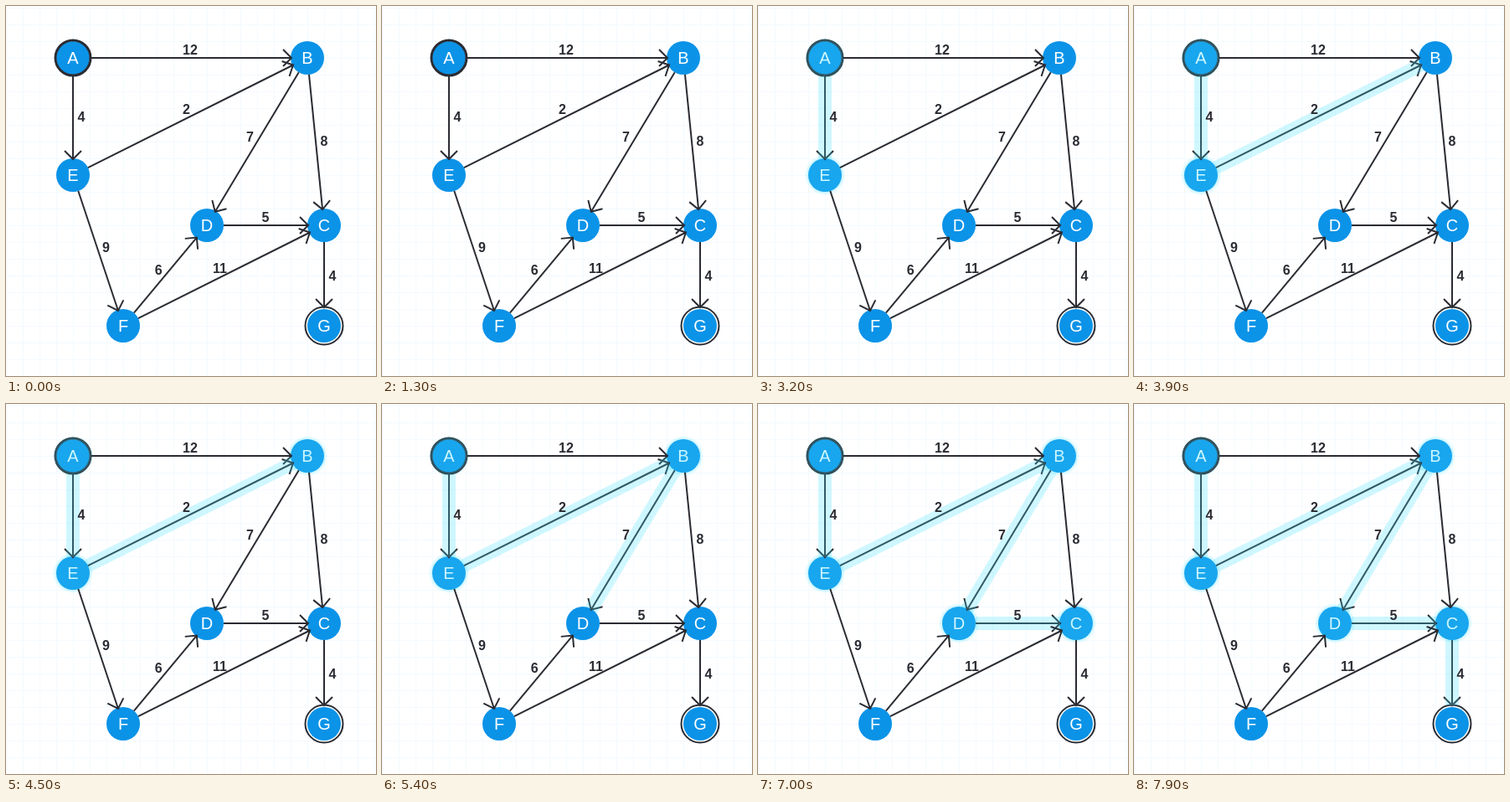
Animation, 442 px wide and 442 px high, one loop 8 s. Source, as an HTML page:

```html
<!DOCTYPE html>
<html lang="en">
<head>
<meta charset="utf-8">
<title>Graph path</title>
<style>
  html, body { margin: 0; width: 100%; height: 100%; overflow: hidden; background: #fff; }
  svg { display: block; width: 442px; height: 442px; }
  text { font-family: "Liberation Sans", Arial, sans-serif; text-anchor: middle; }
  .edge { fill: none; stroke: #2b2c33; stroke-width: 2; }
  .weight { font-size: 16px; font-weight: bold; fill: #2b2c33; }
  .node { fill: #0b93e8; }
  .ring { fill: none; stroke: #2b2c33; }
  .name { font-size: 20px; fill: #fff; }
  .beam { stroke: #40e0ff; stroke-opacity: .25; stroke-width: 16; }
  .halo { fill: #40e0ff; fill-opacity: .25; filter: url(#soft); }
</style>
</head>
<body>
<svg viewBox="0 0 442 442">
  <defs>
    <pattern id="grid" y="2" width="20" height="20" patternUnits="userSpaceOnUse">
      <path d="M.5 0V20M0 .5H20" stroke="#f3faff"/>
    </pattern>
    <filter id="soft"><feGaussianBlur stdDeviation="1"/></filter>
  </defs>
  <rect width="442" height="442" fill="url(#grid)"/>
</svg>
<script>
const LOOP = 8000;
const nodes = {
  A: [80, 62], B: [360, 62], E: [80, 202], D: [240, 262],
  C: [380, 262], F: [140, 382], G: [380, 382]
};
const weights = { AB: 12, AE: 4, EB: 2, BD: 7, BC: 8, EF: 9, DC: 5, FD: 6, FC: 11, CG: 4 };
// Moment in ms at which each node or edge of the path lights up
const litAt = {
  A: 1900, AE: 2600, E: 3200, EB: 3900, B: 4400,
  BD: 5100, D: 5700, DC: 6400, C: 7000, CG: 7600
};

const svg = document.querySelector('svg');
const lights = [];

function add(tag, attrs, text = '') {
  const el = document.createElementNS(svg.namespaceURI, tag);
  for (const key in attrs) el.setAttribute(key, attrs[key]);
  el.textContent = text;
  svg.append(el);
  return el;
}

function addLight(key, tag, attrs) {
  if (key in litAt) lights.push({ el: add(tag, attrs), time: litAt[key] });
}

function addEdge(key) {
  const [from, to] = key;
  const [x1, y1] = nodes[from], [x2, y2] = nodes[to];
  const length = Math.hypot(x2 - x1, y2 - y1);
  const dx = (x2 - x1) / length, dy = (y2 - y1) / length;
  // Point at a distance along the edge and to its side
  const at = (along, side = 0) => [x1 + dx * along - dy * side, y1 + dy * along + dx * side];
  const start = at(from === 'A' ? 22 : 20);
  const end = length - (to === 'G' ? 22 : 19), tip = at(end);

  add('path', {
    class: 'edge',
    d: `M${start}L${tip}M${at(end - 10, -10)}L${tip}L${at(end - 10, 10)}`
  });
  addLight(key, 'line', { class: 'beam', x1: start[0], y1: start[1], x2: tip[0], y2: tip[1] });
  const [x, y] = at(length / 2, dx < 0 ? 10 : -10);
  add('text', { class: 'weight', x, y: y + 5.5 }, weights[key]);
}

function addNode(name) {
  const [cx, cy] = nodes[name];
  if (name === 'G') add('circle', { class: 'ring', cx, cy, r: 22.5, 'stroke-width': 2, style: 'fill: #fff' });
  add('circle', { class: 'node', cx, cy, r: 20 });
  if (name === 'A') add('circle', { class: 'ring', cx, cy, r: 21, 'stroke-width': 3 });
  add('text', { class: 'name', x: cx, y: cy + 7 }, name);
  addLight(name, 'circle', { class: 'halo', cx, cy, r: 22.5 });
}

Object.keys(nodes).forEach(addNode);
Object.keys(weights).forEach(addEdge);

function draw() {
  const time = performance.now() % LOOP;
  for (const light of lights) light.el.style.display = time >= light.time ? '' : 'none';
  requestAnimationFrame(draw);
}
draw();
</script>
</body>
</html>
```
